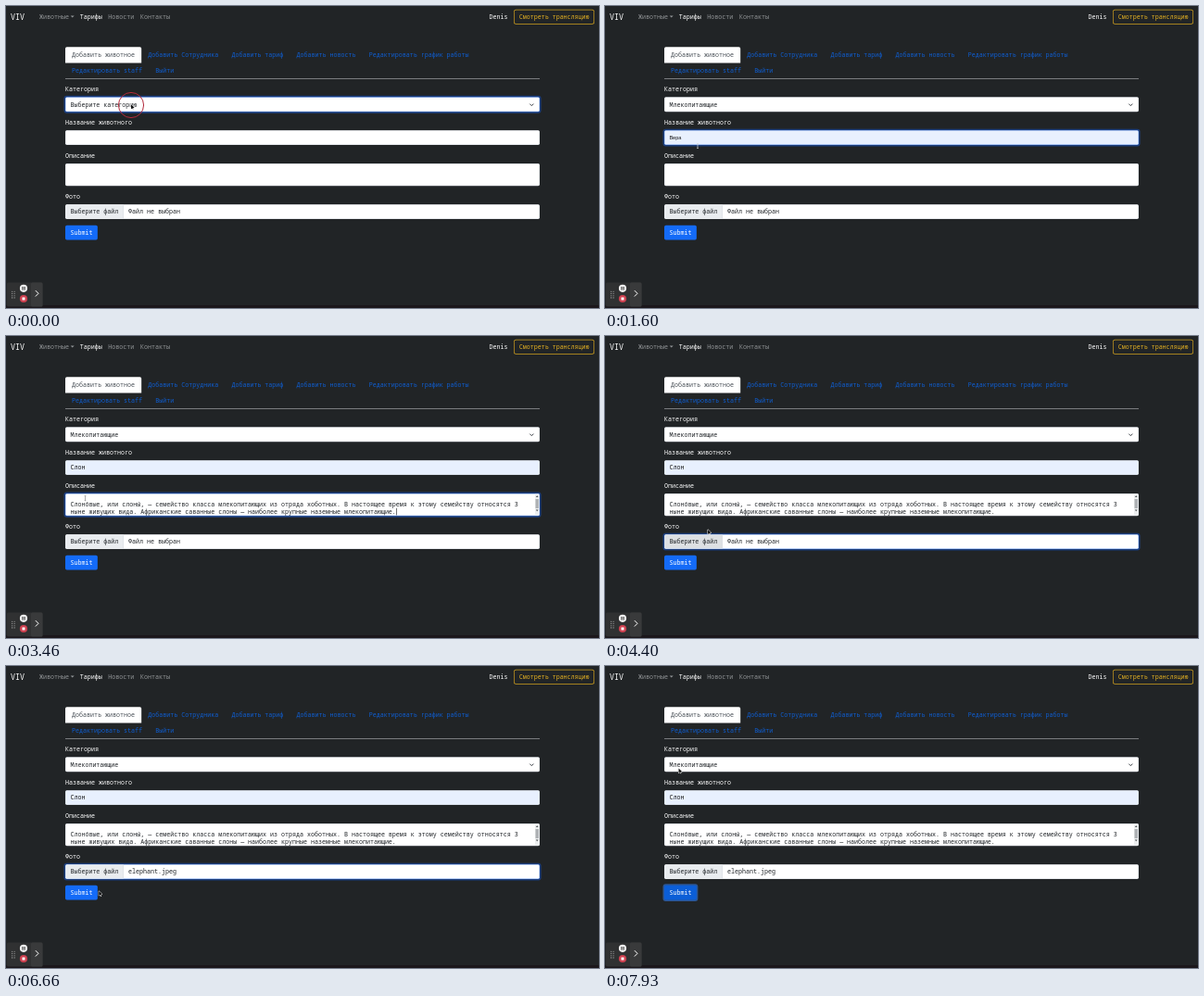
These frames come from a looping animation (640x326 px, 8 s). An HTML page with a canvas:

```html
<!DOCTYPE html>
<html lang="ru">
<head>
<meta charset="utf-8">
<title>Форма</title>
<style>
html, body { margin: 0; width: 100%; height: 100%; overflow: hidden; background: #212426; }
canvas { display: block; width: 100vw; height: 100vh; }
</style>
</head>
<body>
<canvas id="stage" width="640" height="326"></canvas>
<script>
const ctx = document.getElementById('stage').getContext('2d');
const LOOP = 8000, STEP = 1000 / 15;
const PX = 5 / 12, REM = 16 * PX, CHAR = 0.6 * REM;   // page scale, font size, glyph advance
const LEFT = 64, WIDTH = 512, RIGHT = LEFT + WIDTH, ROW = 38 * PX, PAD = 13 * PX;
const MONO = '"Noto Sans Mono", "DejaVu Sans Mono", monospace';
const SANS = '"Liberation Sans", sans-serif';
const BG = '#212426', WHITE = '#fff', INK = '#212529', MUTED = '#929597';
const LINK = '#0f5ed2', RING = '#1b3d7c', EDGE = '#ced4da';

// Moments when the form changes, in ms
const AT = {
  category: 530, name: 930, preview: 1460, nextPreview: 1800, named: 2200,
  about: 2600, caretOff: 3060, paste: 3460, fileHover: 3700, file: 4200,
  chosen: 6260, overSubmit: 7000, submit: 7130
};

// Pointer moves; it rests between them
const MOVES = [
  { from: 0, to: 860, x: 107, y: 138 },
  { from: 930, to: 1600, x: 100, y: 151 },
  { from: 2200, to: 2660, x: 85, y: 174 },
  { from: 3460, to: 4200, x: 105, y: 220 },
  { from: 4260, to: 4930, x: 117, y: 198 },
  { from: 6260, to: 7060, x: 98, y: 249 },
  { from: 7130, to: 7930, x: 79.5, y: 110.5 }
];

const ABOUT = [
  'Слоно\u0301вые, или слоны\u0301, — семейство класса млекопитающих из отряда хоботных. В настоящее время к этому семейству относятся 3',
  'ныне живущих вида. Африканские саванные слоны — наиболее крупные наземные млекопитающие.'
];

const between = (t, a, b) => t >= a && t < b;
const easeOut = k => 1 - (1 - k) ** 3;

// Text is placed by its left edge and the middle of its line
function text(str, x, mid, color = WHITE, size = REM, family = MONO) {
  ctx.font = `${size}px ${family}`;
  ctx.fillStyle = color;
  ctx.fillText(str, x, mid + size * 0.35);
}

function rect(x, y, w, h, color) {
  ctx.fillStyle = color;
  ctx.fillRect(x, y, w, h);
}

function box(x, y, w, h, r, color) {
  ctx.fillStyle = color;
  ctx.beginPath();
  ctx.roundRect(x, y, w, h, r);
  ctx.fill();
}

function framed(x, y, w, h, r, edge, fill, line = PX) {
  box(x, y, w, h, r, edge);
  box(x + line, y + line, w - 2 * line, h - 2 * line, r - line, fill);
}

function circle(x, y, r, fill, stroke) {
  ctx.beginPath();
  ctx.arc(x, y, r, 0, Math.PI * 2);
  if (fill) { ctx.fillStyle = fill; ctx.fill(); }
  if (stroke) { ctx.strokeStyle = stroke; ctx.lineWidth = 1; ctx.stroke(); }
}

// Open angle with its tip at (x, y); arms reach back by (dx, dy), mirrored
function angle(x, y, dx, dy, down, color, filled) {
  ctx.beginPath();
  ctx.moveTo(x - dx, y - dy);
  ctx.lineTo(x, y);
  ctx.lineTo(down ? x + dx : x - dx, down ? y - dy : y + dy);
  ctx.fillStyle = ctx.strokeStyle = color;
  ctx.lineWidth = 1;
  if (filled) ctx.fill(); else ctx.stroke();
}

function navbar() {
  const mid = 11.8;
  text('VIV', 5, mid, WHITE, 20 * PX);
  let x = 36;
  for (const label of ['Животные', 'Тарифы', 'Новости', 'Контакты']) {
    text(label, x, mid, label === 'Тарифы' ? WHITE : MUTED);
    x += label.length * CHAR + REM;
    if (label === 'Животные') {
      angle(x - 3, mid + 0.6, 2, 2, true, MUTED, true);
      x += 5;
    }
  }
  text('Denis', 521.5, mid);
  framed(548, 3.8, 87, 15.9, 2.5, '#d0a01f', BG, 0.7);
  text('Смотреть трансляцию', 553.7, mid, '#e3b022');
}

function tabs() {
  const labels = ['Добавить животное', 'Добавить Сотрудника', 'Добавить тариф',
    'Добавить новость', 'Редактировать график работы', 'Редактировать staff', 'Выйти'];
  const pad = 17 * PX;
  let x = LEFT, mid = 53;
  labels.forEach((label, i) => {
    const w = label.length * CHAR + 2 * pad;
    if (x + w > RIGHT) { x = LEFT; mid += 17; }
    if (i === 0) box(x, 44.3, w, 17.3, [1.7, 1.7, 0, 0], WHITE);
    text(label, x + pad, mid, i === 0 ? '#495057' : LINK);
    x += w;
  });
  rect(LEFT, 78, WIDTH, 0.8, '#909395');
}

// Draws a label and an input under it; returns the input's top
function field(label, top, h, focused, fill = WHITE) {
  text(label, LEFT, top + 5);
  const y = top + 32 * PX;
  if (focused) box(LEFT - 1.5, y - 1.5, WIDTH + 3, h + 3, 3, RING);
  framed(LEFT, y, WIDTH, h, 1.7, focused ? '#6d9bea' : EDGE, fill);
  return y;
}

function form(t) {
  const textX = LEFT + PAD, gap = REM, tall = 24.2;
  let y = field('Категория', 85, ROW, t < AT.name);
  text(t < AT.category ? 'Выберите категорию' : 'Млекопитающие', textX, y + ROW / 2, INK);
  angle(567.3, y + 9.3, 2, 2, true, '#343a40');

  const filled = t >= AT.preview;
  y = field('Название животного', y + ROW + gap, ROW, between(t, AT.name, AT.about), filled ? '#e8f0fe' : WHITE);
  if (filled) {
    const font = t < AT.named ? [13.33 * PX, SANS] : [REM, MONO];
    text(t < AT.nextPreview ? 'Вера' : 'Слон', textX, y + ROW / 2, '#111', ...font);
  }

  y = field('Описание', y + ROW + gap, tall, between(t, AT.about, AT.file));
  aboutText(t, textX, y, tall);

  y = field('Фото', y + tall + gap, ROW, between(t, AT.file, AT.submit));
  const hover = between(t, AT.fileHover, AT.chosen);
  box(LEFT + PX, y + PX, 62.4, ROW - 2 * PX, [1.3, 0, 0, 1.3], hover ? '#dde0e3' : '#e9ecef');
  rect(126.5, y + PX, PX, ROW - 2 * PX, EDGE);
  text('Выберите файл', textX, y + ROW / 2, INK);
  text(t < AT.chosen ? 'Файл не выбран' : 'elephant.jpeg', 132, y + ROW / 2, INK);

  y += ROW + gap;
  const w = 6 * CHAR + 2 * PAD;
  if (t >= AT.submit) box(LEFT - 1.5, y - 1.5, w + 3, ROW + 3, 3, '#2c5694');
  box(LEFT, y, w, ROW, 1.7, t < AT.overSubmit ? '#146bf8' : '#0b5ed7');
  text('Submit', textX, y + ROW / 2);
}

function aboutText(t, x, y, h) {
  const pasted = t >= AT.paste;
  if (pasted) {
    ABOUT.forEach((line, i) => text(line, x, y + 11.8 + i * 8.2, INK));
    const bar = RIGHT - 2.8;
    rect(bar - 2.2, y + 0.6, 4.4, h - 1.2, '#eceeef');
    rect(bar - 1.7, y + 6, 3.4, 10, '#aeb1b4');
    angle(bar, y + 2.2, 1.4, -1.8, true, '#4d5154', true);
    angle(bar, y + 19.2, 1.4, 1.8, true, '#4d5154', true);
    if (t < AT.file) rect(x + ABOUT[1].length * CHAR, y + 15.8, 0.6, 7.6, '#111');
  } else if (between(t, AT.about, AT.caretOff)) {
    rect(x, y + 2.8, 0.6, 7.6, '#111');
  }
}

function recorder() {
  rect(0, 323, 640, 3, '#1b171b');
  box(1, 298.5, 38.5, 26, 1.5, '#303132');
  box(27, 298.5, 12.5, 26, 1.5, '#393a3b');
  for (let i = 0; i < 8; i++) circle(6.7 + (i % 2) * 2.4, 308.3 + (i >> 1) * 2.2, 0.55, '#b8b8b8');
  circle(19, 304.8, 4.1, '#f4f4f4');
  for (const x of [17.4, 19.5]) rect(x, 303, 1.1, 3.6, '#333');
  circle(19, 316, 4.1, '#cf4150');
  rect(17.5, 314.5, 3, 3, WHITE);
  angle(35, 310.3, 3.2, 3.2, false, WHITE);
}

function pointerAt(t) {
  let x = 135, y = 106.3;
  for (const m of MOVES) {
    if (t < m.from) break;
    const k = easeOut(Math.min(1, (t - m.from) / (m.to - m.from)));
    x += (m.x - x) * k;
    y += (m.y - y) * k;
  }
  return [x, y];
}

function beam(x, y) {
  const onField = between(y, 134, 150) || between(y, 170, 194);
  const color = onField ? '#8a8a8a' : '#d5d8da';
  rect(x - 0.35, y - 2.8, 0.7, 5.6, color);
  for (const end of [-2.9, 2.4]) rect(x - 1, y + end, 2, 0.5, color);
}

function arrow(x, y) {
  ctx.beginPath();
  ctx.moveTo(x, y);
  ctx.lineTo(x, y + 5);
  ctx.lineTo(x + 1.3, y + 4);
  ctx.lineTo(x + 2.2, y + 5.6);
  ctx.lineTo(x + 2.2, y + 3.7);
  ctx.lineTo(x + 3.6, y + 3.5);
  ctx.closePath();
  ctx.strokeStyle = WHITE;
  ctx.lineWidth = 1;
  ctx.stroke();
  ctx.fillStyle = '#111';
  ctx.fill();
}

function pointer(t) {
  const [x, y] = pointerAt(t);
  if (t < 2 * STEP) circle(x, y + 0.7, 13.6, null, '#b32a3c');
  const overText = between(t, 600, 1700) || between(t, 2500, AT.fileHover);
  (overText ? beam : arrow)(x, y);
}

function draw(now) {
  const t = Math.floor((now % LOOP + 7) / STEP) * STEP % LOOP;
  rect(0, 0, 640, 326, BG);
  navbar();
  tabs();
  form(t);
  recorder();
  pointer(t);
}

const start = performance.now();
function tick() {
  draw(performance.now() - start);
  requestAnimationFrame(tick);
}
tick();
</script>
</body>
</html>
```
